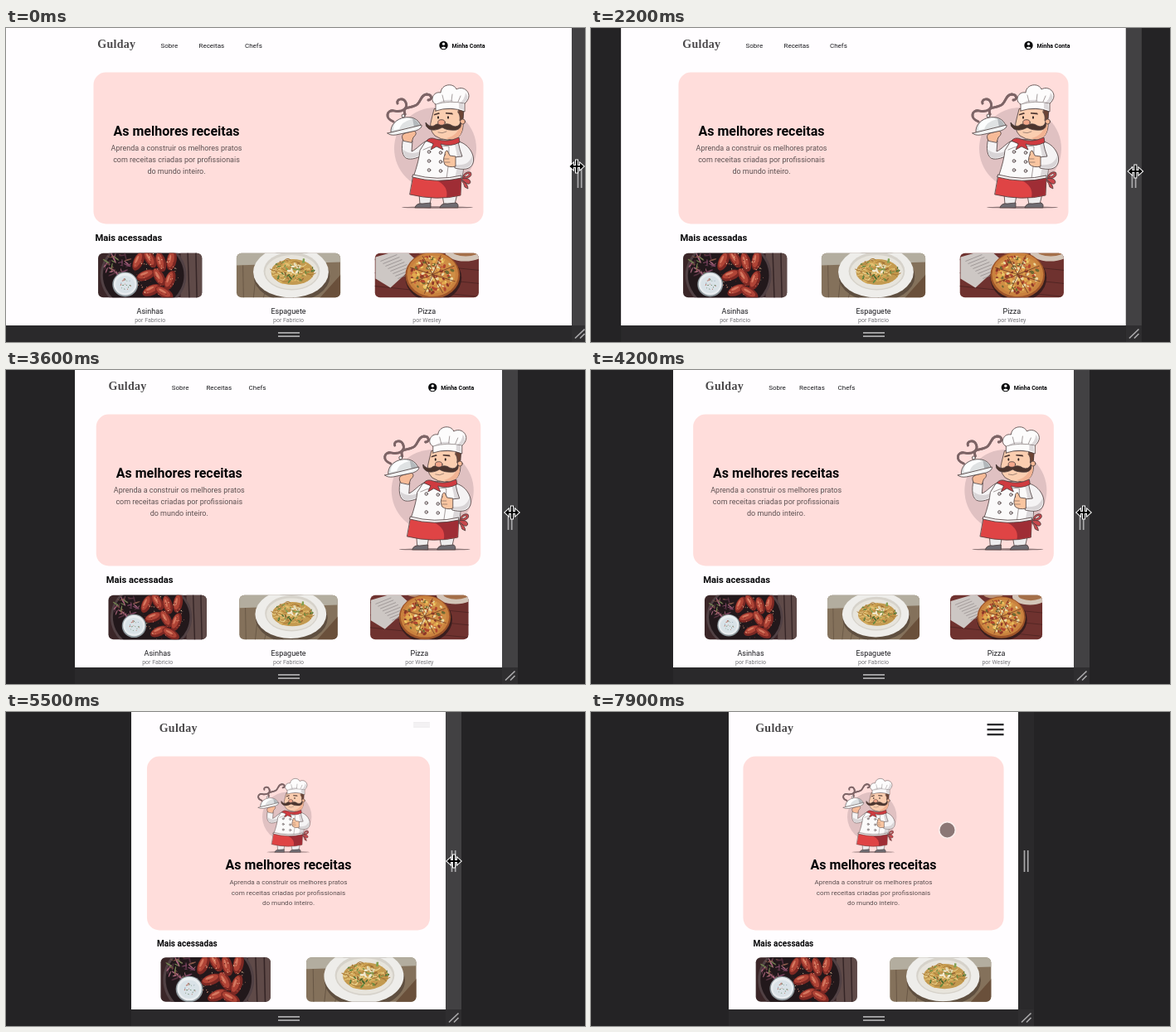
These frames come from a looping animation (698x379 px, 8 s). An HTML page:

```html
<!DOCTYPE html>
<html lang="pt">
<head>
<meta charset="utf-8">
<title>Página de receitas responsiva</title>
<style>
  html, body { margin: 0; width: 100%; height: 100%; overflow: hidden; background: #242325; }
  svg { display: block; width: 698px; height: 379px; font-family: Roboto, Arial, sans-serif; }
  .ink { stroke: #4a3c3c; stroke-width: .8; stroke-linejoin: round; stroke-linecap: round; }
  .fine { fill: none; stroke-width: .5; }
  .mid { text-anchor: middle; }
  .bold { font-weight: 700; fill: #050507; }
  .nav { font-size: 8px; fill: #1b1b1f; }
  .by { font-size: 7px; fill: #77777b; }
  .dish { font-size: 9px; fill: #1b1b1f; }
</style>
</head>
<body>
<svg viewBox="0 0 698 379">
  <rect width="698" height="379" fill="#242325"/>
  <rect id="page" height="359" fill="#fffdff"/>

  <text id="logo" y="24" font-family="Liberation Serif, Times, serif" font-weight="700" font-size="14" letter-spacing=".3" fill="#4a484a">Gulday</text>
  <g id="menu" class="nav">
    <text y="24">Sobre</text><text y="24">Receitas</text><text y="24">Chefs</text>
  </g>
  <g id="account">
    <circle cy="21" r="5.2" fill="#0b0b0d"/>
    <circle cy="19.2" r="1.6" fill="#fff"/>
    <path d="M-3 24Q0 20.8 3 24Q0 26.4-3 24Z" fill="#fff"/>
    <g class="bold" font-size="7">
      <text id="one" x="10" y="24">Minha Conta</text>
      <g id="two"><text x="10" y="20">Minha</text><text x="10" y="28">Conta</text></g>
    </g>
  </g>
  <g id="burger" fill="#2b2b2e">
    <rect width="20"/><rect width="20"/><rect width="20"/>
  </g>

  <rect id="hero" y="53.5" rx="15" fill="#ffdddb"/>
  <text id="title" class="mid bold" font-size="16">As melhores receitas</text>
  <g id="para" class="mid" fill="#5d5152">
    <text>Aprenda a construir os melhores pratos</text>
    <text>com receitas criadas por profissionais</text>
    <text>do mundo inteiro.</text>
  </g>

  <g id="chef">
    <circle cx="517.5" cy="145.5" r="49.5" fill="#e0c1c2"/>
    <ellipse cx="520" cy="216.5" rx="43" ry="1.2" fill="#8d7677"/>
    <!-- steam: a pale ribbon with a dark edge -->
    <g fill="none" stroke-linecap="round">
      <g id="steam" stroke="#7d6466" stroke-width="2.8">
        <path d="M467 113C456 109 459 98 468 100C478 102 485 97 482 90C479 83 470 86 472 91"/>
        <path d="M481 104C477 93 489 98 496 92C501 87 500 81 507 80C514 80 514 87 509 87"/>
      </g>
      <use href="#steam" style="stroke:#ffe6e3;stroke-width:1.5"/>
    </g>
    <!-- legs and shoes -->
    <path class="ink" fill="#eeeced" d="M498 200L499 213H511L513 202ZM526 202L528 213H541L544 200Z"/>
    <path class="ink" fill="#6f6c72" d="M493 216.5Q495 211 502 212L512 211V216.5ZM523 216.5Q525 211 532 212L543 211Q546 213 545 216.5Z"/>
    <!-- apron bow -->
    <g class="ink" fill="#c9474c">
      <path d="M549 182Q553 172 560 174Q563 178 557 181Q553 183 549 182Z"/>
      <path d="M549 182Q559 180 560 186Q559 190 554 187ZM550 184Q557 188 557 194L553 192Q552 187 549 184Z"/>
      <path fill="#ffdddb" d="M552 180Q555 175 558 176Q560 178 552 180Z"/>
    </g>
    <!-- raised arm -->
    <path class="ink" fill="#f5f3f4" d="M508 136C501 138 496 146 489 149L490 136L479 133C476 144 477 157 485 158C492 159 500 155 507 151Z"/>
    <path fill="#d8d4d6" d="M479 147Q479 157 487 157Q497 156 504 150L503 147Q489 155 479 147Z"/>
    <path class="ink" fill="#f7bb98" d="M479 136Q475 129 481 127L492 124Q497 127 491 132L489 138Z"/>
    <!-- jacket -->
    <path class="ink" fill="#fbfafa" d="M506 137Q524 132 545 137Q556 146 552 163L550 182Q520 188 491 180Q498 160 499 148Z"/>
    <path fill="#dcd8da" d="M545 140Q553 148 550 180L541 182Q547 160 541 141Z"/>
    <path class="ink fine" d="M503 147Q516 140 534 143Q535 162 531 182"/>
    <g id="buttons" class="ink" fill="#d5d1d3" stroke-width=".5"></g>
    <!-- apron -->
    <path class="ink" fill="#df4445" d="M491 179Q520 187 549 180L548 202Q520 209 487 201Z"/>
    <path fill="#9f2d35" d="M519 184L548.500 180.500L547.500 201.500L531 204.500Q534 191 519 184Z"/>
    <path class="ink" fill="#f7f1f1" stroke-width=".6" d="M491 177Q520 185 549 178V181Q520 188 490 180Z"/>
    <!-- thumb-up arm -->
    <path class="ink" fill="#f5f3f4" d="M545 137C557 139 566 153 563 163C560 172 550 171 541 169L540 156L550 155Q547 148 545 137Z"/>
    <path fill="#d8d4d6" d="M562 154Q564 168 552 169L542 168V165Q558 167 562 154Z"/>
    <path class="ink" fill="#f9c5a0" d="M529 153Q529 148 532 148L535 154L542 155V167Q534 169 529 165Q526 159 529 153Z"/>
    <path class="ink fine" d="M528 158H534M529 162H535"/>
    <!-- head -->
    <path class="ink" fill="#fbceb0" d="M516 98L513 110Q509 122 517 130Q532 140 547 130Q552 123 551 113L551 98Z"/>
    <path fill="#f2b393" d="M531 133Q545 129 546 119L550 113Q552 126 545 132Q538 136 531 133Z"/>
    <path class="ink" fill="#6d4536" stroke-width=".5" d="M546 98H552L551 109L547 112Q548 105 545 102Z"/>
    <circle class="ink" cx="550.500" cy="113" r="3" fill="#f7b996"/>
    <path fill="#4a342f" d="M516 104L522 102L523 103.500L516 105.500ZM530 102L538 102.500L539 104.500L530 103.500Z"/>
    <ellipse cx="521" cy="108" rx="1" ry="1.700" fill="#271d1d"/>
    <ellipse cx="533" cy="108" rx="1" ry="1.700" fill="#271d1d"/>
    <path class="ink fine" d="M521 126Q526 128 531 125"/>
    <path class="ink" fill="#4d362e" stroke-width=".5" d="M526 117Q533 114 538 118Q545 121 548 114Q550 121 543 123Q532 124 526 120Q517 125 510 122Q505 119 506 114Q510 120 516 118Q520 114 526 117Z"/>
    <ellipse class="ink" cx="525" cy="114" rx="4.300" ry="3.300" fill="#f3a88c" stroke-width=".5"/>
    <!-- hat -->
    <path class="ink" fill="#fdfcfc" d="M518 100L518 92C510 88 515 76 524 78C525 67 540 66 543 74C552 69 561 78 557 86Q555 90 553 91L553 101Q536 94 518 100Z"/>
    <path fill="#dcd8da" d="M546 91Q553 87 554 78Q560 86 551 91L552 99L546 97ZM519 92Q530 88 539 89L538 87Q525 86 519 92Z"/>
    <path class="ink fine" d="M518 92Q535 87 553 91M528 89L526 81M537 88L538 80M545 89L548 82"/>
    <!-- scarf -->
    <path class="ink" fill="#cf3b40" d="M507 136Q511 131 518 134Q532 139 546 132L547 138Q536 144 524 140L527 147L519 143L512 147L515 140Z"/>
    <!-- cloche -->
    <path class="ink" fill="#dfe2e3" d="M464 126C462 107 495 100 500 118Z"/>
    <path fill="#fcfdfd" d="M467 123Q467 112 479 109Q486 108 489 110Q477 113 474 122Z"/>
    <path fill="#b3b8bb" d="M490 109Q497 112 498.500 118L492 119.500Z"/>
    <path class="ink" fill="#f3f4f4" d="M460 127L501 117Q502 121 494 124L470 129Q463 130 460 127Z"/>
    <circle class="ink" cx="479" cy="106" r="2" fill="#eceeee"/>
  </g>

  <text id="section" class="bold">Mais acessadas</text>
  <g id="cards"></g>

  <!-- frame of the resizable view -->
  <rect id="strip" y="359" height="20" fill="#2a292b"/>
  <g fill="#a9a8aa"><rect x="328" y="367" width="26" height="1.800"/><rect x="328" y="371.200" width="26" height="1.800"/></g>
  <g id="side">
    <rect id="panel" width="19" height="359"/>
    <rect y="359" width="19" height="20" fill="#2f2e30"/>
    <path fill="none" stroke="#aaa9ab" stroke-width="1.700" d="M7.500 167V193M11.700 167V193M4 374.500L15.500 363.500M10 374.500L15.500 369"/>
  </g>
  <path id="cursor" fill="#000" stroke="#fff" stroke-width="2" paint-order="stroke" d="M-8.500 0L-4-4V-1H-1V-7.500H1V-1H4V-4L8.500 0L4 4V1H1V7.500H-1V1H-4V4Z"/>
  <circle id="touch" r="9.800" fill="#8c7776" stroke="#fbeeec" stroke-width="1.600"/>
</svg>

<script>
const MID = 340.5, LOOP = 8000, STEP = 100;
const $ = id => document.getElementById(id);
const set = (el, attrs) => { for (const k in attrs) el.setAttribute(k, attrs[k]); };
const move = (el, x, y = 0) => set(el, { transform: `translate(${x} ${y})` });
const show = (el, on) => { el.style.display = on ? '' : 'none'; };

let seed = 7;
const rnd = (a, b) => {
  seed = (seed * 16807) % 2147483647;
  return a + (b - a) * seed / 2147483647;
};
const pick = list => list[Math.floor(rnd(0, list.length))];
const many = (n, draw) => Array.from({ length: n }, (_, i) => draw(i)).join('');
const oval = (x, y, rx, ry, fill, turn = 0) =>
  `<ellipse rx="${rx}" ry="${ry}" fill="${fill}" transform="translate(${x} ${y}) rotate(${turn})"/>`;
const back = fill => `<rect x="-64" y="-43" width="128" height="86" fill="${fill}"/>`;
// n small ovals strewn over an ellipse
const strew = (n, x, y, rx, ry, size, flat, fills) => many(n, () => {
  const a = rnd(0, 2 * Math.PI), r = Math.sqrt(rnd(0, 1)), s = size * rnd(.5, 1.2);
  return oval(x + rx * r * Math.cos(a), y + ry * r * Math.sin(a), s, s * flat, pick(fills), rnd(0, 180));
});

function wings() {
  const spots = [[-14, -17, 115], [0, -20, 60], [13, -16, 75], [26, -18, 100], [-5, 0, -20], [11, 2, 60], [24, 6, 110], [2, 18, 155], [17, 21, 30]];
  return back('#3b2628') +
    '<rect x="37" y="-43" width="27" height="86" fill="#5f4a48"/><path d="M45-43L48 43M55-43L57 43" stroke="#352526" stroke-width="1.500"/>' +
    oval(-8, 0, 52, 45, '#514144') + oval(-8, 0, 49, 42, '#22181b') +
    strew(45, -40, -13, 16, 13, 4, .18, ['#7c4561', '#a9667c', '#71804f', '#54303f', '#8e5a4c']) +
    spots.map(([x, y, a]) => oval(x, y, 12, 6, '#7d2823', a) + oval(x - 1, y - 1, 9.5, 4, '#b04436', a) + oval(x - 2, y - 2, 5, 1.3, '#d6775f', a)).join('') +
    strew(90, 6, 1, 28, 28, .7, .8, ['#efc9a0', '#d88a72', '#6b1f1d']) +
    oval(-30, 11, 15.5, 15, '#8d979c') + oval(-30, 10.5, 14, 13.5, '#e9edf0') + oval(-30, 11, 11.5, 10.5, '#d9e2e7') +
    strew(18, -30, 11, 8, 7, 1, .5, ['#6f8a70', '#8095a8', '#b56a5c']);
}

function pasta() {
  const noodle = () => {
    const a = rnd(0, 2 * Math.PI), r = Math.sqrt(rnd(0, 1)), w = rnd(2, 6);
    return `<path d="M${5 + 23 * r * Math.cos(a) - w} ${-4 + 14 * r * Math.sin(a)}q${w} ${rnd(-7, 7)} ${2 * w} ${rnd(-3, 3)}" fill="none" stroke="${pick(['#e5c374', '#cfa04e', '#a97a38', '#ecd593'])}" stroke-width="1"/>`;
  };
  return back('#84715b') +
    '<path d="M-64-43H64V-16L-64-12Z" fill="#b3ad9f"/><path d="M24 43L64-2V43Z" fill="#6a503b"/>' +
    many(7, i => `<path d="M${-64 + i * 10} 43L${-72 + i * 17}-12" stroke="#625140" stroke-width=".8"/>`) +
    oval(4, 1, 46, 31, '#5f4f40') + oval(3, -4, 45.5, 31, '#eeedea') + oval(4, -5, 34, 23, '#d6d2ca') + oval(4, -4, 32, 20.500, '#e7e4dc') +
    oval(5, -4, 26, 15.500, '#c39a50') + many(80, noodle) +
    strew(45, 5, -6, 25, 15, 2.6, .35, ['#64883f', '#82a052', '#466a31', '#9a6a35']) +
    strew(12, 5, -9, 10, 6, 2.5, .5, ['#f0e8cd', '#dfd3aa']);
}

function pizza() {
  return back('#6f322f') +
    many(6, i => `<path d="M-64 ${-35 + i * 16}L64 ${-22 + i * 16}" stroke="#522624" stroke-width="1"/>`) +
    '<path d="M-62-22L-28-32L-10-16L-44 15L-62 4Z" fill="#cdc7c4"/>' +
    many(8, i => `<path d="M${-56 + i * 3} ${-17 + i * 3}l20-8" stroke="#948c8c" stroke-width=".8"/>`) +
    oval(46, -28, 24, 11, '#d3c5b8') + oval(47, -30, 17, 7, '#a46f49') + oval(-4, -32, 14, 6, '#bb957b') +
    oval(8, 3, 34, 29, '#3a1e1e') + oval(7, 0, 33, 28.500, '#9c5329') + oval(7, -1, 31, 26.500, '#c9813e') + oval(7, -1, 27.500, 23, '#cf8e45') +
    strew(150, 7, -1, 26, 22, 2.4, .65, ['#ecc765', '#b0472f', '#e3a94f', '#8e3828', '#ecd9a2', '#6f6832', '#c9653a']) +
    many(4, i => `<path d="M-29 0H29" stroke="#6d3722" stroke-width=".8" transform="translate(7 -1) scale(1 .85) rotate(${20 + i * 45})"/>`);
}

const dishes = [['Asinhas', 'Fabricio', wings], ['Espaguete', 'Fabricio', pasta], ['Pizza', 'Wesley', pizza]];
$('cards').innerHTML = dishes.map(([name, cook, art], i) => `<g>
  <clipPath id="clip${i}"><rect y="-26.700" height="53.400" rx="6"/></clipPath>
  <g clip-path="url(#clip${i})"><g class="art">${art()}</g></g>
  <text class="mid dish" y="46.500">${name}</text><text class="mid by" y="56.500">por ${cook}</text></g>`).join('');
$('buttons').innerHTML = many(6, i => `<circle cx="${510 + i % 2 * 14}" cy="${149.500 + (i >> 1) * 11 + i % 2}" r="1.800"/>`);

// straight-line interpolation through [position, value] points
function at(keys, v) {
  const i = keys.findIndex(k => k[0] > v);
  if (i < 0) return keys[keys.length - 1][1];
  if (i === 0) return keys[0][1];
  const [a, p] = keys[i - 1], [b, q] = keys[i];
  return p + (q - p) * (v - a) / (b - a);
}

const leftEdge = [[0, -1], [200, -1], [700, 0], [1400, 0], [1500, 2], [2300, 41], [2600, 62], [2700, 62], [3000, 68], [3600, 83], [4200, 99], [4500, 109],
  [5100, 137], [5400, 147], [5500, 151], [5600, 159], [6200, 159], [6300, 161], [6400, 161], [6600, 165], [6700, 165], [6900, 166]];
const grip = [[0, 6], [100, 9], [1500, 11], [3000, 12], [4200, 12], [5100, 13], [5500, 10], [6900, 12]];
const gripY = [[0, 167], [1500, 174], [3000, 172], [4200, 172], [5100, 177], [5500, 180]];
const touchX = [[7100, 488], [7200, 437], [7300, 437], [7400, 434.5], [7500, 433], [7900, 429.5]];
const touchY = [[7100, 191], [7200, 224.5], [7300, 224.5], [7400, 232.5], [7500, 232.5], [7600, 205], [7700, 175], [7800, 155], [7900, 142.5]];
const navGap = [[366, 8], [435, 16], [490, 25]];

function layout(left, t) {
  const right = 2 * MID - left, width = right - left;
  const wide = Math.min(490, .9 * width), heroW = Math.min(470, .9 * width);
  const x0 = MID - wide / 2, x1 = MID + wide / 2;
  const heroL = MID - heroW / 2, heroR = MID + heroW / 2;
  const mobile = width < 384, pair = width < 432;

  set($('page'), { x: left, width });
  set($('strip'), { x: left, width });
  move($('side'), right);

  set($('logo'), { x: x0 + 14.7 });
  const gap = at(navGap, wide), sobre = x0 + 91;
  [sobre, sobre + 21 + gap, sobre + 51.5 + 2 * gap].forEach((x, i) => set($('menu').children[i], { x }));
  move($('account'), x1 - (pair ? 43 : 58));
  show($('menu'), !mobile);
  show($('account'), !mobile);
  show($('one'), !pair);
  show($('two'), pair);

  show($('burger'), mobile);
  const open = t < 5600 ? 0 : t < 5800 ? .92 : 1;
  move($('burger'), x1 - 20);
  set($('burger'), { opacity: .06 + .94 * open });
  [...$('burger').children].forEach((bar, i) => set(bar, { y: 12 + i * 2.35 + open * (2 + i * 3.65), height: 2.35 }));

  set($('hero'), { x: heroL, width: heroW, height: mobile ? 210 : 183 });
  const textX = mobile ? MID : heroL + 100;
  set($('title'), { x: textX, y: mobile ? 190 : 130 });
  set($('para'), { 'font-size': mobile ? 8.1 : 9 });
  [...$('para').children].forEach((line, i) => set(line, { x: textX, y: mobile ? 208 + i * 12.5 : 148 + i * 14 }));
  set($('chef'), { transform: mobile ? 'translate(339 80.5) scale(.6) translate(-518 -69)' : `translate(${heroR - 575.5} 0)` });

  set($('section'), { x: x0 + 12, y: mobile ? 283 : 257, 'font-size': mobile ? 10.1 : 11.2 });
  const pitch = wide * (pair ? .5146 : .3405), w = wide * (pair ? .3885 : .2555);
  [...$('cards').children].forEach((card, i) => {
    show(card, i < 2 || !pair);
    move(card, MID + pitch * (i - (pair ? .5 : 1)), mobile ? 323 : 298.5);
    set(card.querySelector('rect'), { x: -w / 2, width: w });
    set(card.querySelector('.art'), { transform: `scale(${w / 125.5})` });
  });
  return right;
}

function draw(now) {
  const t = Math.floor(now % LOOP / STEP) * STEP;
  const right = layout(at(leftEdge, t), t), dragging = t < 6900;
  set($('panel'), { fill: dragging ? '#424143' : '#2a292b' });
  show($('cursor'), dragging);
  move($('cursor'), right + at(grip, t), at(gripY, t));
  show($('touch'), t >= 7100);
  move($('touch'), at(touchX, t), at(touchY, t));
}

const start = performance.now();
function tick() {
  draw(performance.now() - start);
  requestAnimationFrame(tick);
}
tick();
</script>
</body>
</html>
```
